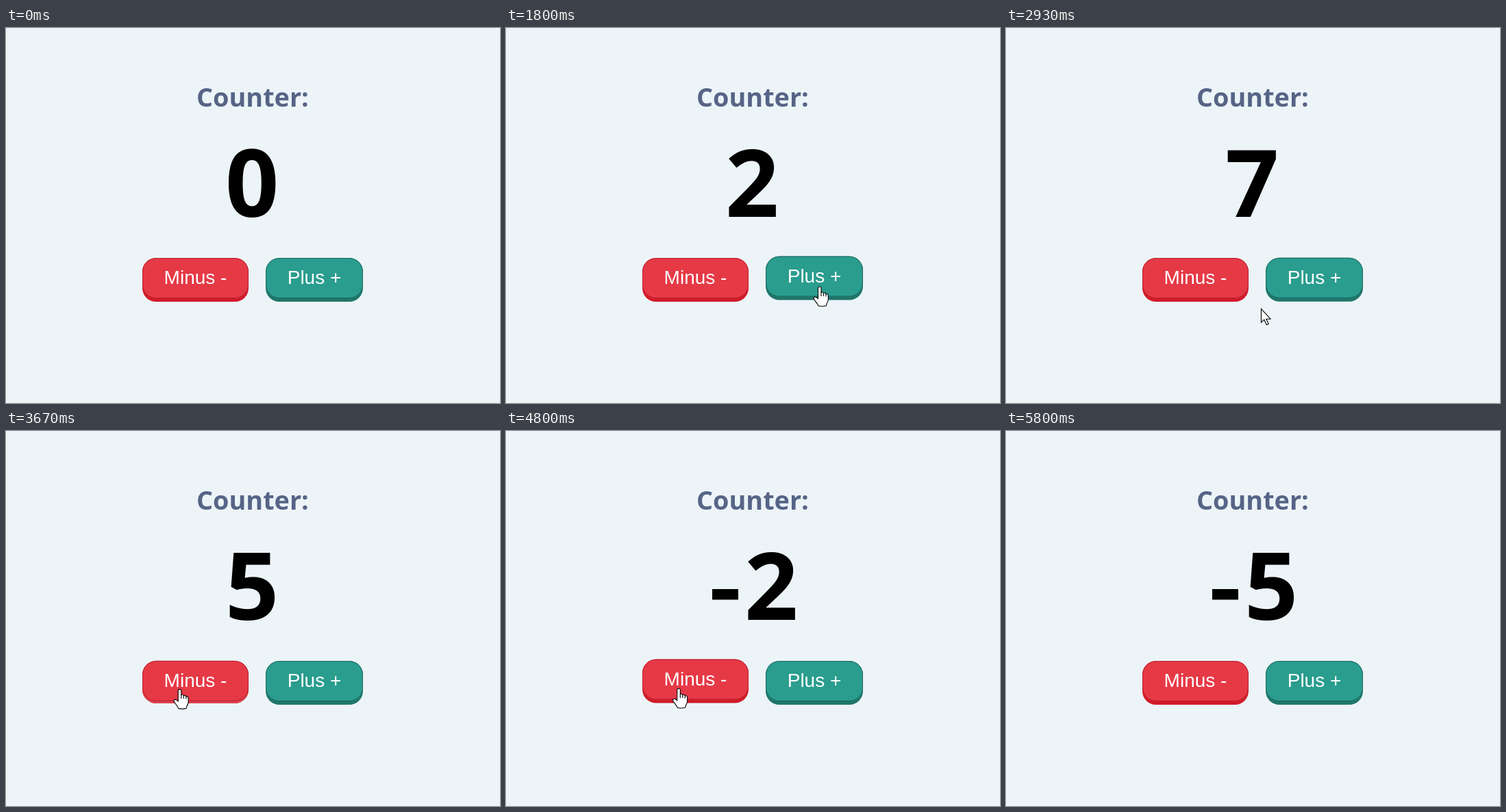
These frames come from a looping animation (721x548 px, 6190 ms). An HTML page with a canvas:

```html
<!DOCTYPE html>
<html lang="en">
<head>
<meta charset="utf-8">
<title>Counter</title>
<style>
  html, body { margin: 0; width: 100%; height: 100%; overflow: hidden; background: #ecf4f8; }
  canvas { display: block; }
</style>
</head>
<body>
<canvas id="stage" width="721" height="548"></canvas>
<script>
const ctx = document.getElementById('stage').getContext('2d');
const LOOP = 6190;
const STEP = 1000 / 15;

// A run of clicks whose spacing widens by a steady amount
const clickRun = (count, first, gap, slowdown = 0) =>
  Array.from({ length: count }, (_, i) => first + gap * i + slowdown * i * i);

const minus = {
  x: 199, width: 155, label: 'Minus -', enter: 3060, leave: 5510,
  fill: '#e63946', edge: '#b81c2a', shadow: '#d11a29', pressed: '#dd4753',
  clicks: clickRun(12, 3448, 130, 3.9)
};
const plus = {
  x: 379, width: 142, label: 'Plus +', enter: 920, leave: 2800,
  fill: '#2a9d8f', edge: '#1b6359', shadow: '#20766b', pressed: '#3f8d83',
  clicks: clickRun(7, 1500, 200)
};

// Pointer stops, eased in between
const stops = [
  { t: 600, x: 470, y: 535 },
  { t: 1200, x: 457, y: 378 },
  { t: 2700, x: 457, y: 378 },
  { t: 2930, x: 372, y: 410 },
  { t: 3300, x: 253, y: 377.5 },
  { t: 5350, x: 251, y: 376 },
  { t: 5790, x: 49, y: 540 }
];

const handShape = new Path2D(
  'M-1.6 17.5V2Q-1.4 0 .6 0Q2.9 0 3 2V8.3Q5.8 7 6.5 9.4Q9.4 8.2 10 10.6' +
  'Q13 10 13.3 13V19Q13 22 11 25L10.2 28Q4.5 29.6 -1.2 28L-2.3 25.6L-7.6 18.2Q-8.6 14.6 -5 15Z');
const handLines = new Path2D('M3 8V14M6.5 9.4V14M10 10.6V14.5');
const arrowShape = new Path2D('M.5 .5V20.2L4.9 16.2L8.3 23.8L11.2 22.4L7.8 15.2H14Z');

const clamp = v => Math.min(1, Math.max(0, v));
const smooth = v => { v = clamp(v); return v * v * (3 - 2 * v); };
const mix = (a, b, k) => a + (b - a) * k;

function pressAmount(clicks, t) {
  return Math.max(...clicks.map(c => smooth((t - c + 100) / 50) * (1 - smooth((t - c) / 70))));
}

function roundBox(x, y, w, h, r) {
  ctx.beginPath();
  ctx.roundRect(x, y, w, h, r);
}

function drawText(text, font, color, x, y, align = 'center') {
  ctx.font = font;
  ctx.fillStyle = color;
  ctx.textAlign = align;
  ctx.fillText(text, x, y);
}

function drawButton(b, t) {
  const hover = smooth((t - b.enter) / 150) * (1 - smooth((t - b.leave) / 170));
  const press = pressAmount(b.clicks, t);
  const y = 336 - 2.5 * hover * (1 - press);
  const depth = mix(5, 3, press);

  roundBox(b.x, y + depth, b.width, 59, 20);
  ctx.fillStyle = b.shadow;
  ctx.fill();
  ctx.globalAlpha = press;
  ctx.fillStyle = b.pressed;
  ctx.fill();
  ctx.globalAlpha = 1;

  roundBox(b.x, y, b.width, 59, 20);
  ctx.fillStyle = b.fill;
  ctx.fill();
  roundBox(b.x + .5, y + .5, b.width - 1, 58, 19.5);
  ctx.strokeStyle = b.edge;
  ctx.lineWidth = 1;
  ctx.stroke();

  drawText(b.label, '28px "Liberation Sans", Arial, sans-serif', '#fff',
    b.x + b.width / 2, y + 38);
}

function drawCount(t) {
  const passed = b => b.clicks.filter(c => c <= t).length;
  const count = passed(plus) - passed(minus);
  const negative = count < 0;
  drawText(Math.abs(count), 'bold 137px "Open Sans", "Noto Sans", sans-serif', '#000',
    negative ? 387 : 359, 276);
  if (negative) ctx.fillRect(301, 231, 38, 15.5);
}

function drawPointer(t) {
  const next = stops.findIndex(s => s.t > t);
  if (next < 1) return;
  const a = stops[next - 1], b = stops[next];
  const k = smooth((t - a.t) / (b.t - a.t));
  const over = [minus, plus].some(button => t >= button.enter && t < button.leave);

  ctx.save();
  ctx.translate(mix(a.x, b.x, k), mix(a.y, b.y, k));
  ctx.fillStyle = '#fff';
  ctx.strokeStyle = '#000';
  ctx.lineWidth = 1.1;
  const shape = over ? handShape : arrowShape;
  ctx.fill(shape);
  ctx.stroke(shape);
  if (over) ctx.stroke(handLines);
  ctx.restore();
}

function draw(now) {
  const time = now % LOOP;
  const t = Math.floor((time + 5) / STEP) * STEP;
  ctx.fillStyle = '#ecf4f8';
  ctx.fillRect(0, 0, 721, 548);
  drawText('Counter:', 'bold 37.8px "Open Sans", "Noto Sans", sans-serif', '#566486',
    278, 115, 'left');
  drawCount(t);
  drawButton(minus, t);
  drawButton(plus, t);
  drawPointer(t);
}

const start = performance.now();
function tick() {
  draw(performance.now() - start);
  requestAnimationFrame(tick);
}
tick();
</script>
</body>
</html>
```
